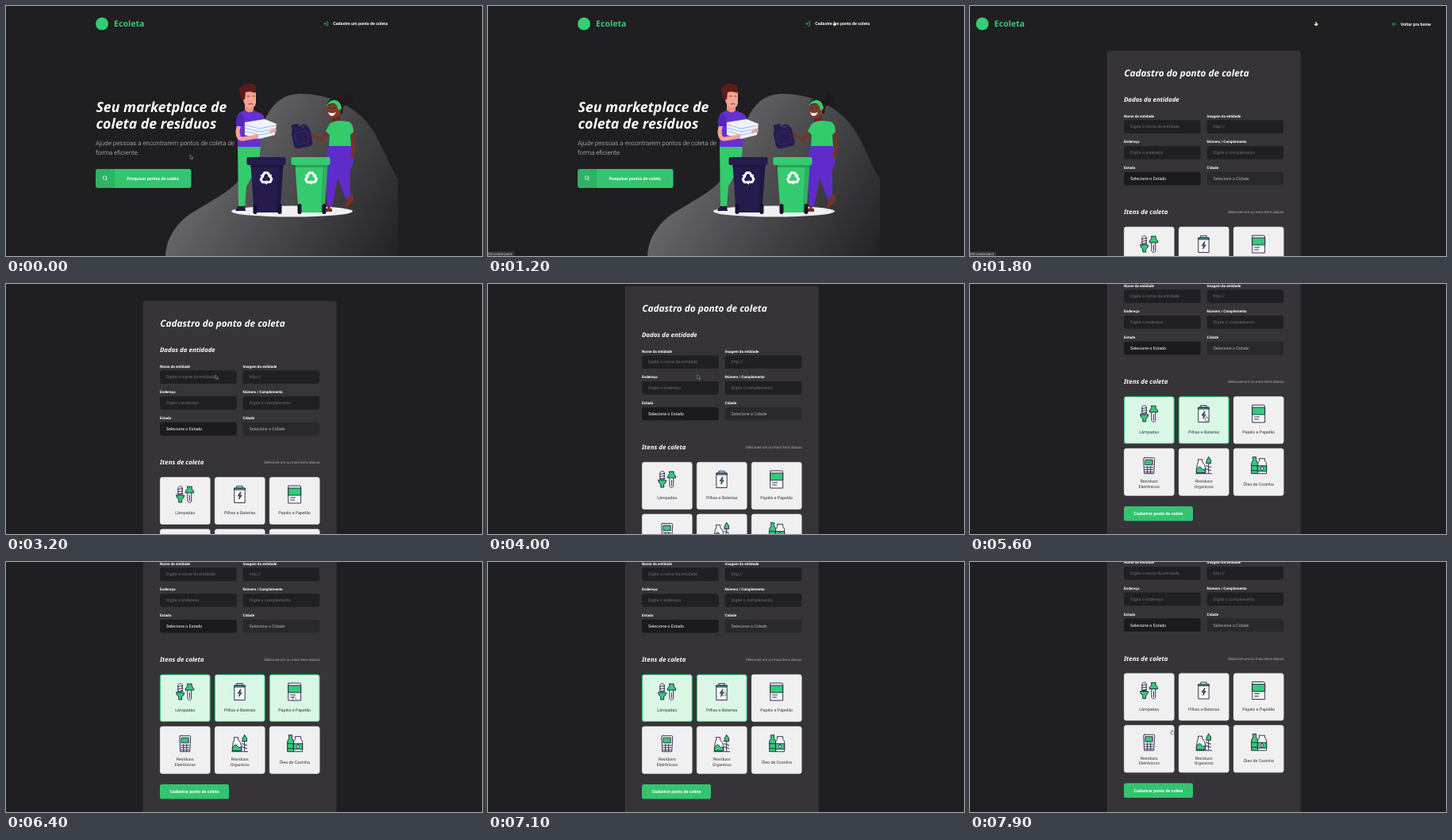
An HTML page that plays this animation: 600 px wide and 316 px high, repeating every 8 s.

```html
<!DOCTYPE html>
<html lang="pt-BR">
<head>
<meta charset="utf-8">
<title>Ecoleta</title>
<style>
  html, body { margin: 0; width: 100%; height: 100%; overflow: hidden; background: #1f1e20; }
  svg { display: block; width: 600px; height: 316px; }
  text { font: 5.33px Roboto, Arial, sans-serif; fill: #fff; text-rendering: geometricPrecision; }
  .title { font-family: "Noto Sans", "Open Sans", sans-serif; font-weight: 700; font-style: italic; }
  .brand { font: 600 10.6px "Noto Sans", "Open Sans", sans-serif; fill: #34cb79; }
  .bold { font-weight: 700; }
  .label { font-size: 4.67px; font-weight: 700; }
  .lead { font-size: 8px; font-weight: 300; fill: #d2cfd3; }
  .note { font-size: 4.67px; font-weight: 300; fill: #e2e0e4; text-anchor: end; }
  .item { fill: #37323f; text-anchor: middle; }
  .card { fill: #f0f0f1; stroke: #f0f0f1; stroke-width: .8; }
  .on .card { fill: #daf7e6; stroke: #34cb79; stroke-width: 1; }
  .icon { stroke: #241c44; stroke-width: .9; stroke-linejoin: round; stroke-linecap: round; fill: #f7f7fa; }
  .icon .g { fill: #34cb79; }
  .icon .n { fill: none; }
  .line { fill: none; stroke: #34cb79; stroke-width: .7; stroke-linecap: round; stroke-linejoin: round; }
  .limb { fill: none; stroke-linecap: round; stroke-linejoin: round; }
</style>
</head>
<body>
<svg id="stage" viewBox="0 0 600 316">
  <defs>
    <linearGradient id="shade" gradientUnits="userSpaceOnUse" x1="230" y1="150" x2="494" y2="316">
      <stop offset="0" stop-color="#747375"/>
      <stop offset=".35" stop-color="#565557"/>
      <stop offset="1" stop-color="#222123"/>
    </linearGradient>
    <g id="recycle" fill="none" stroke="#fff" stroke-width="2.4" stroke-linejoin="round">
      <g id="turn">
        <path d="M-4.2-1.3L-1.7-5.4H1.5L3.1-2.9"/>
        <path d="M1.2-1.8L5.5-4.1L5-.4Z" fill="#fff" stroke="none"/>
      </g>
      <use href="#turn" transform="rotate(120)"/>
      <use href="#turn" transform="rotate(240)"/>
    </g>
    <g id="bin">
      <path d="M5 10H46L42 69Q42 70 41 70H10Q9 70 9 69Z"/>
      <rect width="49" height="10" rx="2"/>
      <path d="M4 10H46V13H4.3Z" fill="#000" opacity=".22"/>
      <path d="M40 13L37 70H41Q42 70 42 69L45.500 13Z" fill="#000" opacity=".13"/>
      <rect x="8" y="59" width="5" height="13" rx="2.500" fill="#17122d"/>
      <rect x="39" y="59" width="5" height="13" rx="2.500" fill="#17122d"/>
    </g>
  </defs>

  <rect width="600" height="316" fill="#1f1e20"/>

  <g id="home">
    <path fill="url(#shade)" d="M201 316C202 296 212 276 235 261C262 244 290 232 303 207C320 174 322 111 371 111C402 111 434 123 454 146C473 168 480 198 494 218V316Z"/>
    <circle cx="121" cy="22.500" r="8" fill="#34cb79"/>
    <text class="brand" x="136" y="26.400">Ecoleta</text>
    <path class="line" d="M404 19.900H405.700V25.100H404M400.500 22.500H403.700M402.400 21.200L403.700 22.500L402.400 23.800"/>
    <text class="bold" x="481" y="24.300" text-anchor="end">Cadastre um ponto de coleta</text>
    <text class="title" style="font-size:17.700px" x="113.500" y="133.800">Seu marketplace de</text>
    <text class="title" style="font-size:17.700px" x="113.500" y="154.600">coleta de resíduos</text>
    <text class="lead" x="113" y="175.600">Ajude pessoas a encontrarem pontos de coleta de</text>
    <text class="lead" x="113" y="188.300">forma eficiente.</text>
    <rect x="113" y="206" width="120.500" height="24" rx="2.700" fill="#34c46f"/>
    <path d="M137 206H115.700Q113 206 113 208.700V227.300Q113 230 115.700 230H137Z" fill="#000" opacity=".09"/>
    <g class="line" style="stroke:#fff"><circle cx="124.500" cy="217.200" r="2.300"/><path d="M126.300 219L127.700 220.400"/></g>
    <text class="bold" x="185" y="219.600" text-anchor="middle">Pesquisar pontos de coleta</text>

    <ellipse cx="360.500" cy="259.500" rx="76.500" ry="7" fill="#f1eff3"/>

    <!-- man -->
    <path d="M292 176H321L319 200L303 228L301 255H293Z" fill="#34cb6b"/>
    <path d="M293 253H301L302 259H289Q290 256 293 253Z" fill="#251b46"/>
    <path d="M301 124H312L312 138H301Z" fill="#ef8f80"/>
    <path d="M292 137Q298 132 302 132Q307 137 312 132L322 136Q327 139 326 148L321 156V178H292Z" fill="#6431d2"/>
    <path d="M299 109Q300 104 307 104Q315 104 315 112V123Q314 129 308 129Q301 128 299 119Z" fill="#f7a393"/>
    <path d="M295 110Q292 102 299 100Q304 96 308 99Q316 97 315 106L314 110Q308 107 302 109L301 118L298 119Q295 116 295 110Z" fill="#5a1d1a"/>
    <path class="limb" d="M304 114H307M311 114H313M306 124Q309 123 311 124" stroke="#5a1d1a" stroke-width=".8"/>
    <path d="M301 147L326 143L341 149L339 163L319 168L301 163Z" fill="#eef2ff"/>
    <path class="limb" d="M301 150L319 155L340 151M301 154L319 159L340 155M301 158L319 163L339 159" stroke="#9db2e8" stroke-width=".9"/>
    <path class="limb" d="M294 148L292 158Q292 169 299 168L316 165" stroke="#f7a393" stroke-width="5"/>
    <path class="limb" d="M334 159L339 157" stroke="#f7a393" stroke-width="4"/>
    <path d="M290 149Q289 138 296 136L301 141L299 152L290 152Z" fill="#5426bb"/>

    <!-- woman -->
    <path d="M407 175H434Q443 191 434 207L434 241L429 246L418 217L411 254H405L402 198Z" fill="#5f2ccb"/>
    <path class="limb" d="M431 243L434 248M407 253V257" stroke="#743426" stroke-width="3.500"/>
    <path d="M429 247L436 238Q440 243 437 247L427 257Q426 251 429 247ZM403 256H411V260H399Z" fill="#743426"/>
    <path class="limb" d="M435 154Q442 176 436 190" stroke="#743426" stroke-width="4.500"/>
    <path class="limb" d="M410 154L397 169L379 160" stroke="#743426" stroke-width="4"/>
    <path d="M411 138H421V150H411Z" fill="#642a20"/>
    <path d="M408 149Q413 145 421 145L432 146Q438 149 438 159L434 163L435 177H407L408 163L403 158Z" fill="#34cb6b"/>
    <path d="M405 124Q407 116 415 117Q421 117 424 122Q425 115 430 110L433 113L437 111L436 115L439 119L435 123L430 124L425 127L424 136H416Z" fill="#20181c"/>
    <path d="M405 128Q410 121 419 125L422 131Q421 142 412 142Q404 141 405 128Z" fill="#7d3b2b"/>
    <path d="M404 127Q407 118 415 119Q422 120 423 130L419 132Q418 123 412 123Q407 123 404 127Z" fill="#34cb6b"/>
    <path d="M406 134Q411 137 416 134Q414 139 410 139Q407 138 406 134Z" fill="#fff"/>
    <path class="limb" d="M407 129H409M413 129H415" stroke="#20181c" stroke-width=".9"/>
    <g transform="rotate(-12 373 166)" fill="#271d50">
      <rect x="361" y="154" width="24" height="25" rx="5"/>
      <rect x="363" y="148" width="9" height="8" rx="1.500"/>
      <path class="limb" d="M372 154Q380 148 383 157" stroke="#271d50" stroke-width="2.500"/>
      <rect x="365" y="159" width="16" height="15" rx="3" fill="none" stroke="#433477" stroke-width=".7"/>
    </g>

    <use href="#bin" x="303.500" y="191" fill="#251b4c"/>
    <use href="#bin" x="359.500" y="191" fill="#34cb70"/>
    <use href="#recycle" transform="translate(328 217.500) scale(1.250)"/>
    <use href="#recycle" transform="translate(384.500 217.500) scale(1.250)"/>
  </g>

  <g id="form"></g>

  <g id="status">
    <rect y="310.500" width="33" height="6" fill="#39383b"/>
    <text x="0" y="314.700" style="font-size:4.400px;fill:#c9c8ca">00/create-point</text>
  </g>

  <g id="arrow"><path d="M0 0V5.200L1.300 4.100L2.200 5.900L3.100 5.400L2.300 3.700H3.900Z" fill="#111" stroke="#d5d5d5" stroke-width=".45"/></g>
  <g id="hand"><path d="M-.8-2Q0-3 .8-2V-.5L2.300 0Q2.800 .3 2.500 1.400L1.800 2.900H-1.200L-2.500.8Q-2 0-.8 1Z" fill="#fff" stroke="#222" stroke-width=".5"/></g>
</svg>

<script>
const $ = id => document.getElementById(id);
const text = (x, y, s, cls, style = '') => `<text x="${x}" y="${y}" class="${cls}" style="${style}">${s}</text>`;
const rect = (x, y, w, h, fill) => `<rect x="${x}" y="${y}" width="${w}" height="${h}" rx="2.7" fill="${fill}"/>`;
const path = (d, cls = '') => `<path d="${d}" class="${cls}"/>`;

// Icons are drawn around their own centre.
const icons = [
  path('M-8.500-9Q-6-12-3.500-9V0H-8.500Z') + path('M-9-6.500L-3-7.500M-9-3.500L-3-4.500M-9-.5L-3-1.500', 'n') +
  path('M-11 1H-1Q-1 5-4 6V10H-8V6Q-11 5-11 1Z', 'g') +
  path('M3.500-3H8V9Q5.700 12 3.500 9Z') + path('M3-10H8.500V-7L11-4V-2H.5V-4L3-7Z', 'g') +
  path('M5.800 1V8', 'n'),

  path('M-3.500-10.500H3.500V-8H-3.500Z') + path('M-6.500-8H6.500V10.500H-6.500Z') + path('M-6.500-8H6.500V-6H-6.500Z', 'g') +
  path('M1-3L-2.500 2H0L-1 6L2.500 1H.3Z', 'g'),

  path('M-7.500-11H6Q8-11 8-9V11H-7.500Z') + path('M-7.500-8H8V1H-7.500Z', 'g') + path('M-5 4H1M-5 7H0', 'n'),

  path('M-6-10H6Q7-10 7-8L6 10H-6L-7-8Q-7-10-6-10Z') + path('M-4.500-7.500H4.500V-1H-4.500Z', 'g') +
  path('M-5 2H5M-5 5H5M-5 8H5M-2 1V9M2 1V9', 'n'),

  path('M-7-8H-2V-5Q2-1 2 3V9H-9V3Q-9-1-7-5Z') + path('M-9 4L-5 1L-1 5L2 4V9H-9Z', 'g') +
  path('M6-11Q10-8 9-3H3Q3-8 6-11Z', 'g') + path('M6-3V9M3 0L9 2M3 4L9 6M-10 10H10', 'n'),

  path('M-7-11H-3V-7L-1-3V10H-9V-3L-7-7Z', 'g') + path('M-9 0H-1M-9 6H-1', 'n') +
  path('M1-9H8V-6Q10-4 10-2V10H-1V-2Q-1-4 1-6Z') + path('M-1 0H10V7H-1Z', 'g') +
  path('M4.500 1Q8 5 4.500 5.500Q1 5 4.500 1Z')
];
const items = ['Lâmpadas', 'Pilhas e Baterias', 'Papéis e Papelão',
  'Resíduos|Eletrônicos', 'Resíduos|Organicos', 'Óleo de Cozinha'];
const fields = [
  ['Nome da entidade', 'Digite o nome da entidade'], ['Imagem da entidade', 'http://'],
  ['Endereço', 'Digite o endereço'], ['Número / Complemento', 'Digite o complemento'],
  ['Estado', 'Selecione o Estado', '#1b1a1c', '#fff'], ['Cidade', 'Selecione a Cidade', '#29282b', '#b5b3b8']
];

function field([label, hint, fill = '#201f21', ink = '#706e74'], i) {
  const x = 194 + i % 2 * 104.6, y = 144.2 + (i >> 1) * 32.8;
  return text(x, y - 3.6, label, 'label') + rect(x, y, 96.7, 16.7, fill) +
    text(x + 8, y + 10.2, hint, '', `fill:${ink}`);
}

function card(name, i) {
  const lines = name.split('|'), first = lines.length > 1 ? 43.7 : 47.2;
  return `<g id="card${i}" transform="translate(${194 + i % 3 * 69} ${279 + (i > 2 ? 65.7 : 0)})">
    <rect class="card" x=".4" y=".4" width="62.700" height="59.200" rx="2.500"/>
    <g class="icon" transform="translate(31.700 22)">${icons[i]}</g>
    ${lines.map((s, n) => text(31.7, first + n * 6.4, s, 'item')).join('')}</g>`;
}

$('form').innerHTML =
  '<circle cx="15.500" cy="22.500" r="8" fill="#34cb79"/>' + text(30.5, 26.4, 'Ecoleta', 'brand') +
  path('M537.300 22.900H532.500M534.700 20.700L532.500 22.900L534.700 25.100', 'line') +
  text(581, 24.6, 'Voltar pra home', 'bold', 'text-anchor:end') +
  rect(172.7, 56.5, 244, 420, '#363439') +
  text(194.3, 89.3, 'Cadastro do ponto de coleta', 'title', 'font-size:11.8px') +
  text(194, 120.8, 'Dados da entidade', 'title', 'font-size:7.9px') +
  fields.map(field).join('') +
  text(194, 263.4, 'Itens de coleta', 'title', 'font-size:7.9px') +
  text(395.5, 262.3, 'Selecione um ou mais itens abaixo', 'note') +
  items.map(card).join('') +
  rect(194, 418, 87, 18.6, '#34c46f') +
  text(237.5, 429.2, 'Cadastrar ponto de coleta', 'bold', 'text-anchor:middle');

const LOOP = 8000, STEP = 100, NAV = 1400;
const scroll = [[2900, 0], [3400, 54], [4000, 54], [4450, 137], [7700, 137], [7900, 138.5]];
const mouse = [[0, 232, 188], [200, 232, 188], [900, 437, 22], [1900, 436, 22], [2600, 264, 115],
  [4000, 264, 115], [4400, 256, 123], [4600, 256, 123], [4900, 230, 170], [5100, 230, 170],
  [5400, 298, 170], [5700, 298, 170], [6000, 363, 172], [6600, 363, 172], [6950, 298, 166],
  [7300, 297, 166], [7500, 240, 172], [7600, 240, 172], [7800, 255, 215]];
// Selected spans per card
const picked = [[5000, 7600], [5400, 7300], [6100, 6500]];

const ease = p => p * p * (3 - 2 * p);

function at(track, t) {
  const i = track.findIndex(k => k[0] > t);
  if (i === 0) return track[0].slice(1);
  if (i < 0) return track[track.length - 1].slice(1);
  const a = track[i - 1], b = track[i], p = ease((t - a[0]) / (b[0] - a[0]));
  return a.slice(1).map((v, n) => v + (b[n + 1] - v) * p);
}

const show = (id, on) => $(id).setAttribute('visibility', on ? 'visible' : 'hidden');

function draw(t) {
  const [top] = at(scroll, t), [x, y] = at(mouse, t);
  show('home', t < NAV);
  show('form', t >= NAV);
  show('status', t >= 1000 && t < 2100);
  $('form').setAttribute('transform', `translate(0 ${-top})`);
  picked.forEach(([from, to], i) => $('card' + i).classList.toggle('on', t >= from && t < to));
  const link = (t >= 800 && t < 2000) || (t >= 4700 && y > 141);
  show('hand', link);
  show('arrow', !link);
  for (const id of ['hand', 'arrow']) $(id).setAttribute('transform', `translate(${x} ${y})`);
}

const start = performance.now();
function tick() {
  const t = (performance.now() - start) % LOOP;
  draw(Math.floor(t / STEP) * STEP);
  requestAnimationFrame(tick);
}
tick();
</script>
</body>
</html>
```
